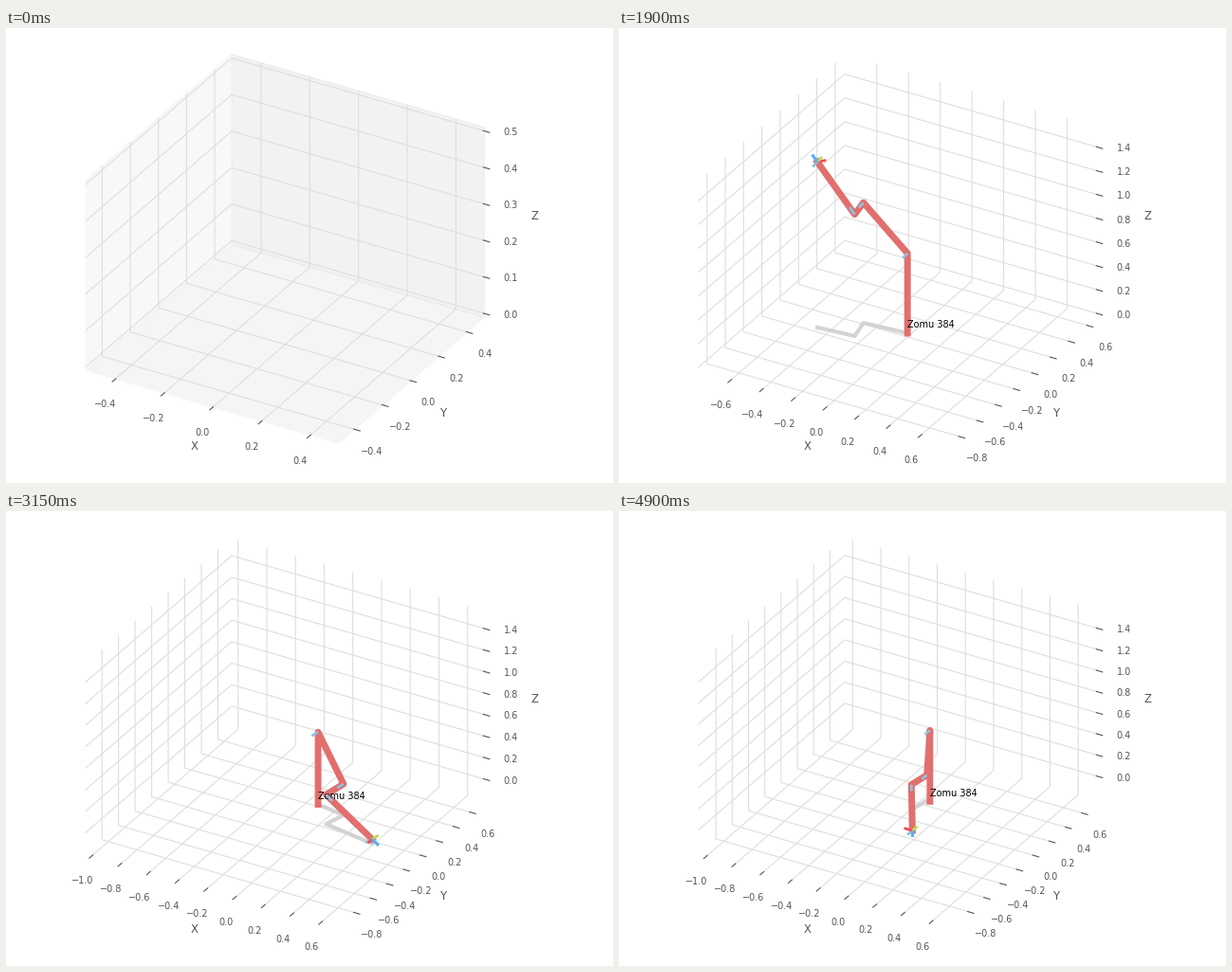
Recreate the animation shown at these times as a matplotlib script. Size 640x480 px, loop 4950 ms.

```python
import numpy as np
import matplotlib.pyplot as plt
from matplotlib.animation import FuncAnimation

# A six-joint arm without motor torque falls from its upright pose.

FRAMES, STEP = 99, 0.05
SUBSTEPS = 5
NAME = "Zomu 384"
AXIS_LEN = 0.06

# Standard DH table: d, a, alpha
DH = np.array([
    [0.6718, 0, np.pi / 2],
    [0, 0.4318, 0],
    [0.15005, 0.0203, -np.pi / 2],
    [0.4318, 0, np.pi / 2],
    [0, 0, -np.pi / 2],
    [0, 0, 0],
])
MASS = [0, 17.4, 4.8, 0.82, 0.34, 0.09]
COM = np.array([
    [0, 0, 0],
    [-0.3638, 0.006, 0.2275],
    [-0.0203, -0.0141, 0.070],
    [0, 0.019, 0],
    [0, 0, 0],
    [0, 0, 0.032],
])
INERTIA = np.array([
    [0, 0.35, 0],
    [0.13, 0.524, 0.539],
    [0.066, 0.086, 0.0125],
    [1.8e-3, 1.3e-3, 1.8e-3],
    [0.3e-3, 0.4e-3, 0.3e-3],
    [0.15e-3, 0.15e-3, 0.04e-3],
])
GEAR = np.array([-62.6111, 107.815, -53.7063, 76.0364, 71.923, 76.686])
MOTOR = np.array([200e-6] * 3 + [33e-6] * 3) * GEAR**2
VISCOUS = np.array([1.48e-3, 0.817e-3, 1.38e-3, 71.2e-6, 82.6e-6, 36.7e-6]) * GEAR**2
OFFSET = np.array([[a, d * np.sin(al), d * np.cos(al)] for d, a, al in DH])
Z = np.array([0, 0, 1.0])
NEXT, LAST = [1, 2, 0], [2, 0, 1]


def cross(u, v):
    return u[..., NEXT] * v[..., LAST] - u[..., LAST] * v[..., NEXT]


def rotation(angle, alpha):
    c, s, ca, sa = np.cos(angle), np.sin(angle), np.cos(alpha), np.sin(alpha)
    return np.array([[c, -s * ca, s * sa], [s, c * ca, -c * sa], [0, sa, ca]])


def torques(q, qd, qdd, lift):
    """Recursive Newton-Euler for a batch of rates and accelerations."""
    rots = [rotation(t, al) for t, al in zip(q, DH[:, 2])]
    w = wd = np.zeros((len(qd), 3))
    vd = lift[:, None] * Z
    forces, moments = [], []
    for j, rot in enumerate(rots):
        spin = qd[:, j:j + 1] * Z
        wd = (wd + qdd[:, j:j + 1] * Z + cross(w, spin)) @ rot
        w = (w + spin) @ rot
        vd = cross(wd, OFFSET[j]) + cross(w, cross(w, OFFSET[j])) + vd @ rot
        acc = cross(wd, COM[j]) + cross(w, cross(w, COM[j])) + vd
        forces.append(MASS[j] * acc)
        moments.append(wd * INERTIA[j] + cross(w, w * INERTIA[j]))
    f = n = np.zeros_like(vd)
    tau = np.zeros_like(qd)
    for j in reversed(range(6)):
        if j < 5:
            f, n = f @ rots[j + 1].T, n @ rots[j + 1].T
        n = n + cross(OFFSET[j], f) + cross(OFFSET[j] + COM[j], forces[j]) + moments[j]
        f = f + forces[j]
        tau[:, j] = n @ rots[j][2]
    return tau + MOTOR * qdd + VISCOUS * qd


UNIT_ACC = np.vstack([np.zeros(6), np.eye(6)])
LIFT = np.array([9.81] + [0] * 6)


def slope(state):
    q, qd = state
    rates = np.zeros((7, 6))
    rates[0] = qd
    tau = torques(q, rates, UNIT_ACC, LIFT)
    return np.array([qd, np.linalg.solve(tau[1:].T, -tau[0])])


def simulate():
    state = np.zeros((2, 6))
    state[0, 1:3] = np.pi / 2, -np.pi / 2
    h = STEP / SUBSTEPS
    path = [state[0]]
    for _ in range(FRAMES):
        for _ in range(SUBSTEPS):
            k1 = slope(state)
            k2 = slope(state + h / 2 * k1)
            k3 = slope(state + h / 2 * k2)
            k4 = slope(state + h * k3)
            state = state + h / 6 * (k1 + 2 * k2 + 2 * k3 + k4)
        path.append(state[0])
    return path


def pose(q):
    """Positions and orientations of the base and every link frame."""
    rot, pos = np.eye(3), np.zeros(3)
    points, rots = [pos], [rot]
    for angle, (_, _, alpha), offset in zip(q, DH, OFFSET):
        rot = rot @ rotation(angle, alpha)
        pos = pos + rot @ offset
        points.append(pos)
        rots.append(rot)
    return np.array(points), np.array(rots)


poses = [pose(q) for q in simulate()]
# The view only ever grows, starting from the arm's zero pose.
reach = np.array([pose(np.zeros(6))[0]] + [p for p, _ in poses])
low = np.minimum.accumulate(reach.min(axis=1))[1:]
high = np.maximum.accumulate(reach.max(axis=1))[1:]

plt.rcParams.update({
    "font.family": "DejaVu Sans", "font.size": 7,
    "axes.labelsize": 8.4, "axes.labelcolor": "#555555", "axes.labelpad": 1.2,
    "axes.edgecolor": "white", "axes.linewidth": 1,
    "xtick.color": "#555555", "ytick.color": "#555555",
    "grid.color": "#dedede", "grid.linewidth": 0.8,
})
fig = plt.figure(figsize=(6.4, 4.8), dpi=100, facecolor="white")
ax = fig.add_subplot(projection="3d", proj_type="ortho", facecolor="white")
fig.subplots_adjust(left=-0.09, bottom=0, right=0.99, top=1)
ax.set(xlabel="X", ylabel="Y", zlabel="Z")
axes = (ax.xaxis, ax.yaxis, ax.zaxis)


def stroke(color, width, **kw):
    return ax.plot([], [], [], color=color, lw=width, **kw)[0]


shadow = stroke("lightgrey", 3)
arm = stroke("#E16F6D", 5)
label = ax.text(0, 0, 0.05, NAME, color="black", zorder=3)
short = dict(zorder=4, solid_capstyle="butt")
joints = [stroke("#8FC1E2", 2, **short) for _ in range(6)]
tool = [stroke(c, 2, **short) for c in ("#F84752", "#BADA55", "#54AEFF")]
parts = [shadow, arm, label, *joints, *tool]


def set_view(lo, hi, steps):
    setters = (ax.set_xlim, ax.set_ylim, ax.set_zlim)
    for axis, setter, a, b, step in zip(axes, setters, lo, hi, steps):
        first, last = np.ceil(a / step - 1e-6), np.floor(b / step + 1e-6)
        axis.set_ticks(np.arange(first, last + 1) * step)
        pad = (b - a) / 48
        setter(a - pad, b + pad)


def set_panes(shades):
    for axis, shade in zip(axes, shades):
        axis.set_pane_color((shade, shade, shade, 0.5))


def set_ray(line, start, direction):
    line.set_data_3d(*np.array([start, start + AXIS_LEN * direction]).T)


def draw(i):
    for part in parts:
        part.set_visible(i > 0)
    if i == 0:
        set_panes((0.95, 0.90, 0.925))
        set_view((-0.5, -0.5, 0), (0.5, 0.5, 0.5), (0.2, 0.2, 0.1))
        return parts
    k = i + 1
    points, rots = poses[k]
    set_panes((1, 1, 1))
    size = (high[k] - low[k]).max()
    lo = (low[k] + high[k] - size) / 2
    set_view(lo, lo + size, (0.2, 0.2, 0.2))
    arm.set_data_3d(*points.T)
    shadow.set_data_3d(points[:, 0], points[:, 1], np.zeros(7))
    for line, p, r in zip(joints, points[1:], rots[1:]):
        set_ray(line, p, r[:, 2])
    for line, direction in zip(tool, rots[-1].T):
        set_ray(line, points[-1], direction)
    return parts


anim = FuncAnimation(fig, draw, frames=FRAMES, init_func=lambda: draw(0),
                     interval=4950 / FRAMES, repeat=True, blit=False)
plt.show()
```
